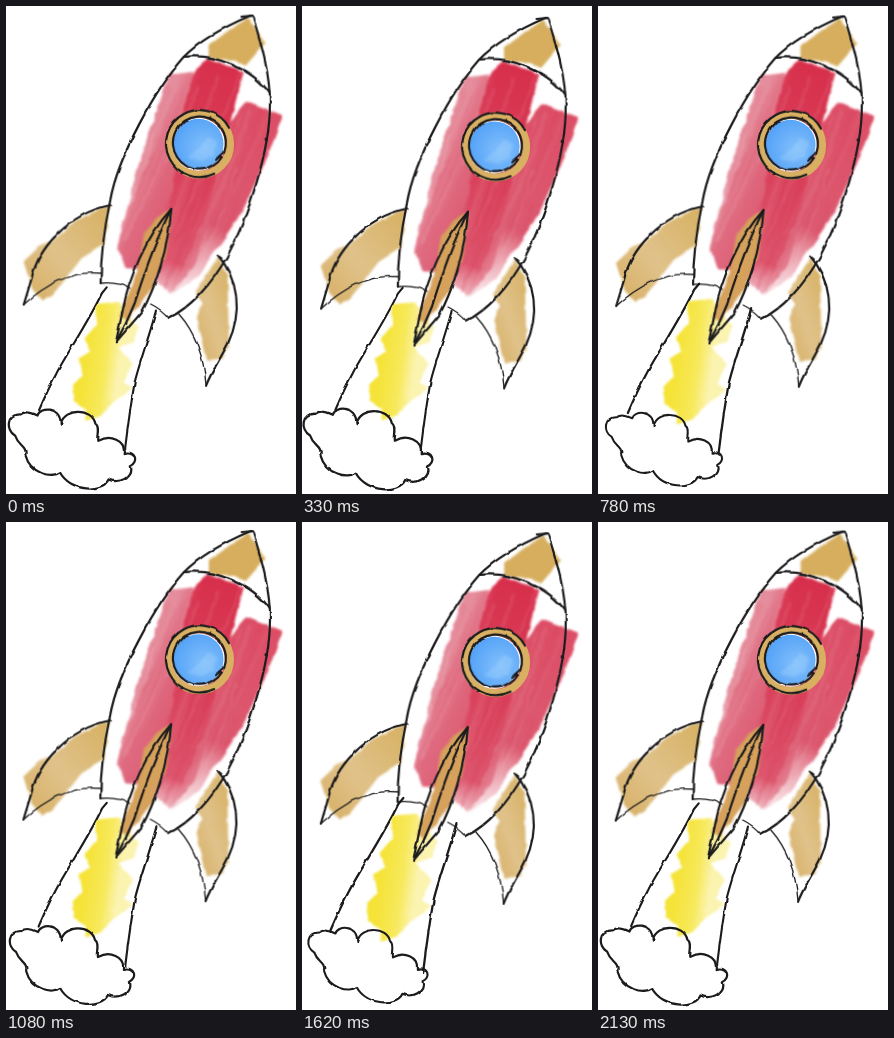
An HTML page for the animation above (2.16 s loop, 290x488 px).

```html
<!DOCTYPE html>
<html lang="en">
<head>
<meta charset="utf-8">
<title>Rocket</title>
<style>
html, body { margin: 0; width: 100%; height: 100%; overflow: hidden; background: #fff; }
svg { display: block; width: 100vw; height: 100vh; }
.ink { fill: none; stroke: #1b1b1d; stroke-width: 2.2; stroke-linecap: round; stroke-linejoin: round; filter: url(#rough); }
.thin { stroke-width: 1.3; }
.paint { filter: url(#ragged); }
</style>
</head>
<body>
<svg viewBox="0 0 290 488" preserveAspectRatio="none">
  <defs>
    <filter id="rough" color-interpolation-filters="sRGB">
      <feTurbulence type="fractalNoise" baseFrequency=".07" numOctaves="2" seed="4"/>
      <feDisplacementMap in="SourceGraphic" scale="3" xChannelSelector="R" yChannelSelector="G"/>
    </filter>
    <filter id="ragged" color-interpolation-filters="sRGB">
      <feTurbulence type="fractalNoise" baseFrequency=".08" numOctaves="2" seed="9"/>
      <feDisplacementMap in="SourceGraphic" scale="4" xChannelSelector="R" yChannelSelector="G"/>
      <feGaussianBlur stdDeviation=".9"/>
    </filter>
    <linearGradient id="red" gradientUnits="userSpaceOnUse" x1="222" y1="60" x2="148" y2="288">
      <stop offset="0" stop-color="#d72f4b"/>
      <stop offset=".5" stop-color="#da425c"/>
      <stop offset=".85" stop-color="#dd566d"/>
      <stop offset="1" stop-color="#e58a99" stop-opacity=".5"/>
    </linearGradient>
    <linearGradient id="pink" gradientUnits="userSpaceOnUse" x1="140" y1="150" x2="178" y2="166">
      <stop offset="0" stop-color="#e58d9c"/>
      <stop offset=".35" stop-color="#e06c81"/>
      <stop offset="1" stop-color="#dc5d74"/>
    </linearGradient>
    <linearGradient id="rose" gradientUnits="userSpaceOnUse" x1="262" y1="100" x2="180" y2="286">
      <stop offset="0" stop-color="#dc4d65"/>
      <stop offset=".65" stop-color="#dc5a70"/>
      <stop offset="1" stop-color="#eeb0ba" stop-opacity=".4"/>
    </linearGradient>
    <linearGradient id="tan" x1="1" y1="0" x2="0" y2="1">
      <stop offset="0" stop-color="#d6b061"/>
      <stop offset=".55" stop-color="#e0c28a"/>
      <stop offset="1" stop-color="#d6ae63"/>
    </linearGradient>
    <linearGradient id="fire" x1="0" y1="0" x2="1" y2=".25">
      <stop offset=".3" stop-color="#f5e338"/>
      <stop offset=".6" stop-color="#f7e95c"/>
      <stop offset=".8" stop-color="#fbf3b0"/>
    </linearGradient>
    <radialGradient id="glass" cx=".62" cy=".58" r=".62">
      <stop offset="0" stop-color="#83c0fb"/>
      <stop offset="1" stop-color="#55a3f8"/>
    </radialGradient>
    <clipPath id="hull">
      <path d="M163 69L186 66L202 52L238 66L224 118L240 95L277 110L262 150L236 208L190 270L165 288L116 262L111 238L131 160Z"/>
    </clipPath>
  </defs>

  <g id="flame">
    <path class="paint" fill="url(#fire)" d="M89 296L113 294L133 320L129 336L112 341L128 358L118 377L128 383L104 401L95 412L80 417L78 405L68 398L66 380L76 370L73 352L84 345L78 332L90 318Z"/>
    <g class="ink">
      <path d="M101 279L96 285C83 313 57 352 49 368Q40 385 31 406"/>
      <path d="M152 303C147 324 136 353 130 377Q125 405 120 446"/>
    </g>
  </g>

  <g id="smoke">
    <path class="ink" d="M10 430C0 424 2 408 15 409C20 405 26 407 32 410C34 402 54 400 55 418C59 402 86 403 89 418C94 421 90 430 91 435C104 428 119 435 117 447C129 444 132 456 123 460C126 471 113 478 102 473C96 486 65 486 54 466C47 472 25 468 20 449C22 440 13 440 10 430"/>
  </g>

  <g id="rocket">
    <g class="paint" fill="url(#tan)">
      <path fill="#d6ae5e" d="M203 52L203 40L224 24L243 12L260 37L240 60L222 54Z"/>
      <path d="M103 199L98 238L75 252L58 274L46 288L35 294L26 284L17 255L35 238L46 234L72 213Z"/>
      <path d="M212 250L221 270L222 340L216 353L200 354L190 312L195 298L189 286Z"/>
    </g>

    <g class="paint">
      <path fill="url(#pink)" d="M163 69L187 66L178 130L172 190L156 264L118 262L111 240L132 160Z"/>
      <path fill="url(#red)" d="M202 52L238 66L222 125L210 190L188 260L164 288L146 272L165 190L172 130L187 68Z"/>
      <path fill="url(#rose)" d="M240 95L277 110L262 150L236 206L192 270L166 288L190 230L205 190L224 118Z"/>
      <g id="streaks" clip-path="url(#hull)" fill="none" stroke-linecap="round"></g>
    </g>

    <path class="paint" fill="#d5a15b" d="M138 226L151 211L165 204L160 246L145 282L121 314L112 310L130 268Z"/>

    <circle cx="193.5" cy="138.5" r="30.5" fill="none" stroke="#d9b062" stroke-width="8"/>
    <circle cx="192.5" cy="138.5" r="26.5" fill="#fff"/>
    <circle cx="192.5" cy="138" r="25" fill="url(#glass)"/>
    <path class="paint" fill="#a5d4fd" opacity=".35" d="M182 152L202 132L211 136L208 150L196 156Z"/>

    <g class="ink">
      <path d="M245 10C219 21 194 35 178 51C150 82 112 150 104 194C98 222 94 248 94 277"/>
      <path d="M236 11L247 10C255 36 265 70 264 100C264 145 241 214 221 250C205 279 183 302 162 312"/>
      <path d="M178 51C207 47 247 63 264 88"/>
      <path class="thin" d="M94 277C105 276 116 278 123 283M144 298C152 302 157 306 162 312"/>
      <path d="M104 199C62 207 31 243 25 272L17 298"/>
      <path class="thin" d="M17 298C38 279 63 264 94 267"/>
      <path d="M211 249C232 274 236 306 221 338C213 354 204 366 199 380"/>
      <path class="thin" d="M172 308C187 325 197 350 199 380"/>
      <path d="M165 203C139 231 122 273 116 304L109 336"/>
      <path d="M165 203C162 243 148 283 135 306L109 336"/>
      <path d="M165 203C148 236 136 272 128 297Q120 317 109 336"/>
      <path d="M208 168A33.5 33.5 0 1 1 223 122"/>
      <path d="M216 151A26.5 26.5 0 1 1 218 147L210 154"/>
    </g>
  </g>
</svg>
<script>
const STEP = 30, STEPS = 72;
const part = id => document.getElementById(id);
const scaleAbout = (x, y, s) => `translate(${x} ${y}) scale(${s}) translate(${-x} ${-y})`;

// Dry-brush streaks running along the hull.
function paintStreaks() {
  let seed = 17;
  const rand = () => (seed = seed * 16807 % 2147483647) / 2147483647;
  let lines = '';
  for (let i = 0; i < 50; i++) {
    const y = 50 + rand() * 150, len = 50 + rand() * 120;
    const x = 165 + rand() * 130 - (y - 50) * .4;
    lines += `<path d="M${x} ${y}q${-len * .15} ${len * .5} ${-len * .42} ${len}"
      stroke="${rand() < .5 ? '#fff' : '#c81f3d'}" stroke-width="${1 + rand() * 5}" opacity="${.03 + rand() * .08}"/>`;
  }
  part('streaks').innerHTML = lines;
}

function draw(step) {
  // The last step repeats the first pose.
  const loop = step / (STEPS - 1);
  const wave = (cycles, peak) => Math.cos(2 * Math.PI * (cycles * loop - peak));

  const shake = wave(15, .28);
  const tilt = -.32 - .4 * shake;
  part('rocket').setAttribute('transform',
    `translate(${-1.3 * tilt} ${.5 + 2.6 * shake}) rotate(${tilt} 150 200)`);
  part('smoke').setAttribute('transform', scaleAbout(66, 444, .973 + .07 * wave(6, .85)));
  part('flame').setAttribute('transform', scaleAbout(92, 350, 1.01 - .05 * wave(6, .92)));
}

let start, shown = -1;
function tick(now) {
  start ??= now;
  const step = Math.floor((now - start) / STEP) % STEPS;
  if (step !== shown) draw(shown = step);
  requestAnimationFrame(tick);
}

paintStreaks();
draw(0);
requestAnimationFrame(tick);
</script>
</body>
</html>
```
